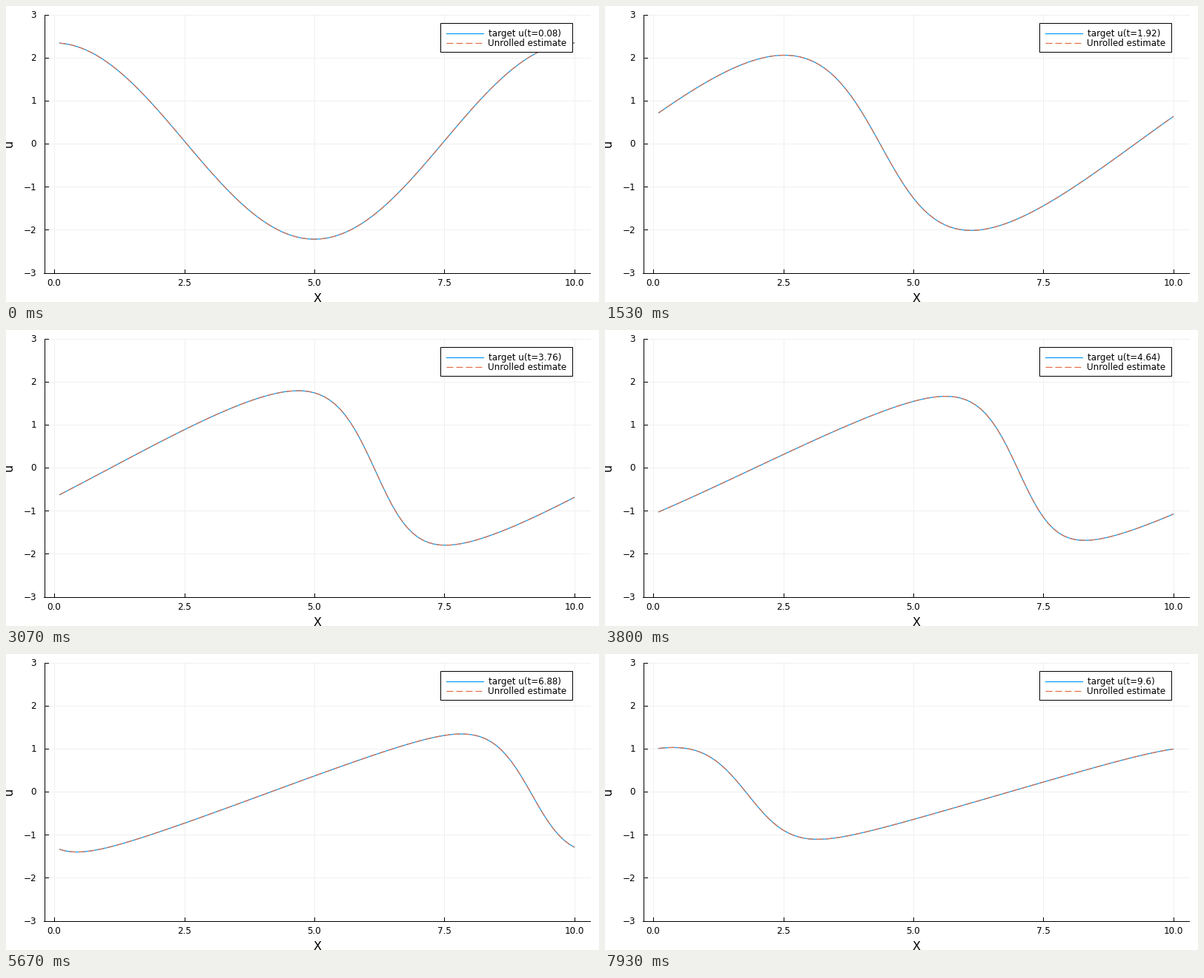
Recreate the animation shown at these times as a matplotlib script. Size 800x400 px, loop 8000 ms.

```python
import numpy as np
import matplotlib.pyplot as plt
from matplotlib.animation import FuncAnimation
from matplotlib.patches import Rectangle

W, H, DPI = 800, 400, 100
TICK, LOOP, STEPS = 20, 8000, 120
BLUE, ORANGE = "#009AFA", "#E26F46"
LEFT, RIGHT, TOP, BOTTOM = 51.5, 787.5, 11.5, 360.5

# Travelling, steepening wave on a periodic grid
N, DX, DT = 100, 0.1, 0.08
SPEED, STEEP, VISC, LEAN = 0.988, 0.211, 0.105, 0.003
x = DX * np.arange(1, N + 1)


def rate(u):
    back, ahead = np.roll(u, 1), np.roll(u, -1)
    slope = (u - back) / DX
    bend = (ahead - 2 * u + back) / DX**2
    return (VISC + LEAN * u) * bend - (SPEED + STEEP * u) * slope


def advance(u, steps=4):
    h = DT / steps
    for _ in range(steps):
        a = rate(u)
        b = rate(u + h / 2 * a)
        c = rate(u + h / 2 * b)
        d = rate(u + h * c)
        u = u + h / 6 * (a + 2 * b + 2 * c + d)
    return u


waves = [0.06 + 2.28 * np.cos(2 * np.pi * x / 10)]
while len(waves) < STEPS:
    waves.append(advance(waves[-1]))


def pt(px):
    return px * 72 / DPI


def to_x(v):
    return LEFT + (v + 0.197) / 10.494 * (RIGHT - LEFT)


def to_y(v):
    return TOP + (3 - v) / 6 * (BOTTOM - TOP)


plt.rcParams["font.family"] = "DejaVu Sans"
fig = plt.figure(figsize=(W / DPI, H / DPI), dpi=DPI, facecolor="white")
ax = fig.add_axes([0, 0, 1, 1])
ax.set_xlim(0, W)
ax.set_ylim(H, 0)
ax.axis("off")


def line(xs, ys, color="black", width=1.0, **kw):
    return ax.plot(xs, ys, color=color, lw=pt(width), **kw)[0]


def label(px, py, s, size=12, **kw):
    return ax.text(px, py, s, fontsize=pt(size), color="black", **kw)


def dashed(xs, ys, **kw):
    # dash lengths are multiples of the line width
    return line(xs, ys, ORANGE, 1.2, dashes=(7.5, 3.3), dash_capstyle="butt", **kw)


for v in (0, 2.5, 5, 7.5, 10):
    px = to_x(v)
    line([px, px], [TOP, BOTTOM], "#F0F0F0", zorder=1)
    line([px, px], [BOTTOM - 5, BOTTOM], zorder=4)
    label(px - 0.2, 378, f"{v:.1f}", ha="center", va="baseline")
for v in range(-3, 4):
    py = to_y(v)
    line([LEFT, RIGHT], [py, py], "#F0F0F0", zorder=1)
    line([LEFT, LEFT + 5], [py, py], zorder=4)
    label(41, py + 4.5, str(v).replace("-", "\u2212"), ha="right", va="baseline")
line([LEFT, LEFT], [TOP, BOTTOM + 0.5], zorder=4)
line([LEFT - 0.5, RIGHT], [BOTTOM, BOTTOM], zorder=4)
label(420, 400, "X", 16, ha="center", va="baseline")
label(9, 186, "u", 16, rotation=90, rotation_mode="anchor",
      ha="center", va="baseline")

px = to_x(x)
solid = line(px, px, BLUE, 1.2, zorder=2)
dash = dashed(px, px, zorder=3)

ax.add_patch(Rectangle((585.5, 22.5), 178, 39, fc="white", ec="black",
                       lw=pt(1), zorder=5))
line([594, 644], [36.5, 36.5], BLUE, 1.2, zorder=6)
dashed([594, 644], [49.5, 49.5], zorder=6)
title = label(651.2, 40.6, "", 11.9, va="baseline", zorder=6)
label(650.2, 53.6, "Unrolled estimate", 11.9, va="baseline", zorder=6)


def draw(i):
    # the wave steps 15 times a second, on a 10 ms clock
    k = int((TICK * (i + 0.5) + 3.4) * STEPS / LOOP)
    py = to_y(waves[k])
    solid.set_data(px, py)
    dash.set_data(px, py)
    title.set_text(f"target u(t={round(DT * (k + 1), 2)})")
    return solid, dash, title


anim = FuncAnimation(fig, draw, frames=LOOP // TICK, interval=TICK,
                     repeat=True, repeat_delay=0)
plt.show()
```
